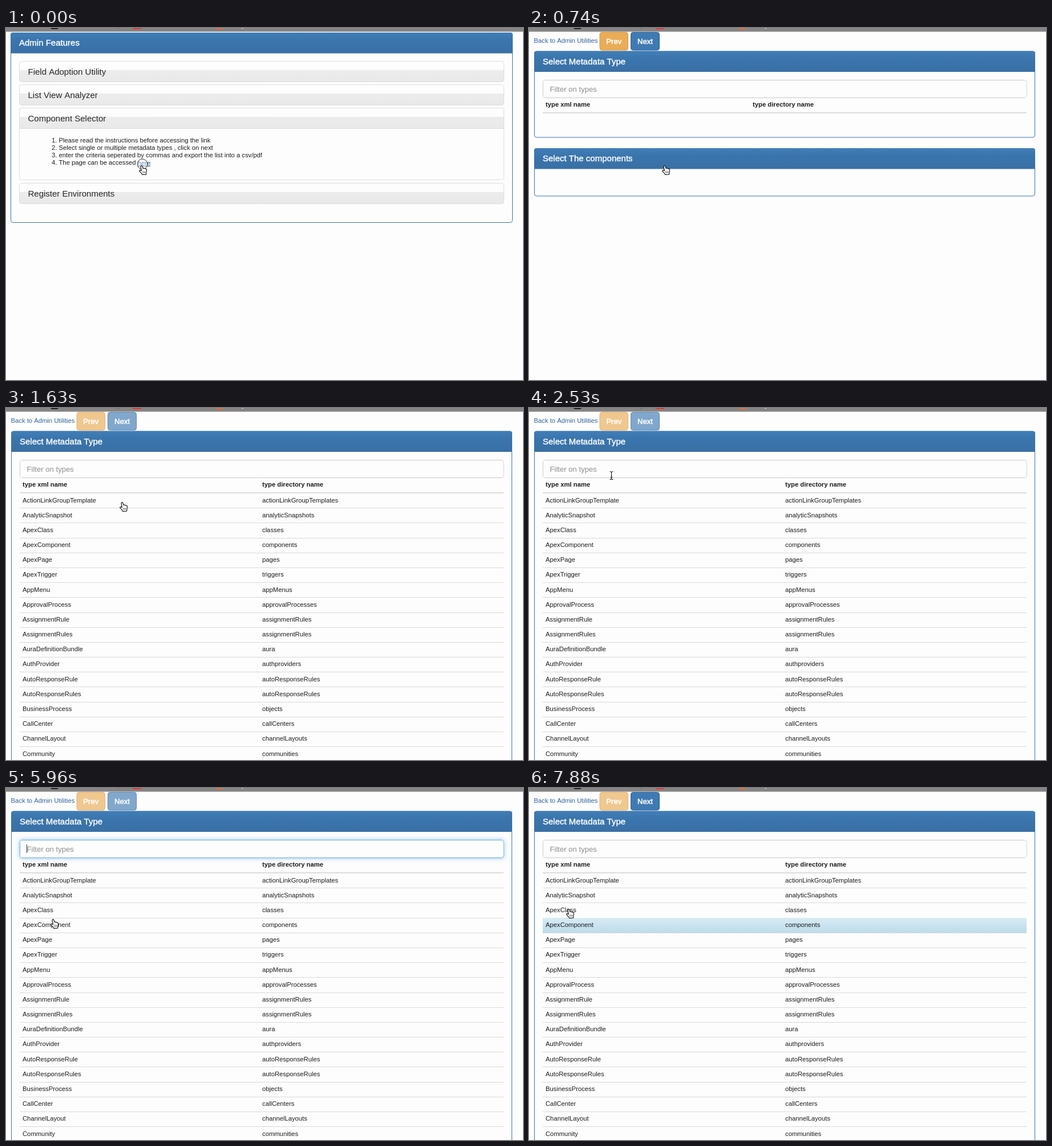
An HTML page with a canvas that plays this animation: 906 by 618 pixels, repeating every 8000 ms.

```html
<!DOCTYPE html>
<html lang="en">
<head>
<meta charset="utf-8">
<title>Admin Features</title>
<style>
  html, body { margin: 0; width: 100%; height: 100%; overflow: hidden; background: #fdfdfd; }
  canvas { display: block; }
</style>
</head>
<body>
<canvas id="stage" width="906" height="618"></canvas>
<script>
const ctx = document.getElementById('stage').getContext('2d');
const W = 906, H = 618, LOOP = 8000;
const FAMILY = '"Liberation Sans", Arial, sans-serif';
const PAGE = '#fdfdfd', BLUE = '#3b75ac', INK = '#1c1c1c';
const SMALL = 11.25, MEDIUM = 13.125, LARGE = 15;

const TYPES = [
  ['ActionLinkGroupTemplate', 'actionLinkGroupTemplates'],
  ['AnalyticSnapshot', 'analyticSnapshots'],
  ['ApexClass', 'classes'],
  ['ApexComponent', 'components'],
  ['ApexPage', 'pages'],
  ['ApexTrigger', 'triggers'],
  ['AppMenu', 'appMenus'],
  ['ApprovalProcess', 'approvalProcesses'],
  ['AssignmentRule', 'assignmentRules'],
  ['AssignmentRules', 'assignmentRules'],
  ['AuraDefinitionBundle', 'aura'],
  ['AuthProvider', 'authproviders'],
  ['AutoResponseRule', 'autoResponseRules'],
  ['AutoResponseRules', 'autoResponseRules'],
  ['BusinessProcess', 'objects'],
  ['CallCenter', 'callCenters'],
  ['ChannelLayout', 'channelLayouts'],
  ['Community', 'communities']
];

const STEPS = [
  'Please read the instructions before accessing the link',
  'Select single or multiple metadata types , click on next',
  'enter the criteria seperated by commas and export the list into a csv/pdf',
  'The page can be accessed '
];

// Pointer stops: time, shape, x, y
const POINTER = [
  [0, hand, 233, 241],
  [1330, hand, 231, 236],
  [1480, hand, 219, 207],
  [1630, hand, 199, 165],
  [1780, beam, 184, 128],
  [1930, beam, 177, 115],
  [2530, beam, 144, 118],
  [5530, beam, 137, 130],
  [5680, hand, 107, 168],
  [5830, hand, 87, 209],
  [5960, hand, 78, 230],
  [6110, hand, 74, 244],
  [7740, hand, 69, 227],
  [7880, hand, 65, 212]
];

// Times at which the text caret flips, starting hidden
const CARET_FLIPS = [3130, 3430, 3880, 4480, 4930, 5380, 5830, 6400, 6850, 7300];

const within = (t, from, to) => t >= from && t < to;

function text(str, x, y, size, color = INK, { bold = false, align = 'left', weight = 0 } = {}) {
  ctx.font = `${bold ? 'bold ' : ''}${size}px ${FAMILY}`;
  ctx.textAlign = align;
  ctx.fillStyle = color;
  ctx.fillText(str, x, y);
  if (weight) {
    ctx.strokeStyle = color;
    ctx.lineWidth = weight;
    ctx.strokeText(str, x, y);
  }
}

function box(x, y, w, h, radius, fill, stroke) {
  ctx.beginPath();
  ctx.roundRect(x, y, w, h, radius);
  if (fill) { ctx.fillStyle = fill; ctx.fill(); }
  if (stroke) { ctx.strokeStyle = stroke; ctx.lineWidth = 1; ctx.stroke(); }
}

function rule(x1, x2, y, color, width = 1) {
  ctx.fillStyle = color;
  ctx.fillRect(x1, y, x2 - x1, width);
}

function vertical(y, h, ...stops) {
  const g = ctx.createLinearGradient(0, y, 0, y + h);
  stops.forEach(([at, color]) => g.addColorStop(at, color));
  return g;
}

function topBar() {
  rule(0, W, 0, '#868484', 6.5);
  box(78, -6, 14, 8, 3, '#222');
  box(221, -6, 17, 8, 3, '#e23b35');
  box(367, -6, 14, 8, 3, '#ec6d35');
  rule(196, 198, 0, '#555');
  rule(413, 416, 0, '#ddd');
}

function panel(x, y, w, h, title) {
  box(x, y, w, h, 4, PAGE, BLUE);
  box(x - 0.5, y - 0.5, w + 1, 36.5, [4, 4, 0, 0],
    vertical(y, 36, [0, '#407db7'], [0.35, '#3b75ad'], [1, '#3970a5']));
  text(title, x + 14.5, y + 22.5, LARGE, '#fff', { weight: 0.4 });
}

function accordion(y, title, open) {
  const h = 36, grey = vertical(y, h, [0, PAGE], [0.42, PAGE], [0.42, '#ececec'], [1, '#e9e9e9']);
  if (open) box(23.5, y, 849, 126, 4, PAGE, '#ddd');
  box(23.5, y, 849, h, open ? [4, 4, 0, 0] : 4, grey, '#ddd');
  text(title, 38.5, y + 23, LARGE, '#282828');
}

function adminPage() {
  panel(8.5, 8.5, 879, 333, 'Admin Features');
  accordion(58.5, 'Field Adoption Utility');
  accordion(99.5, 'List View Analyzer');
  accordion(140.5, 'Component Selector', true);
  accordion(272.5, 'Register Environments');
  STEPS.forEach((line, i) => {
    const y = 201 + i * 13.15;
    text(`${i + 1}.`, 89.5, y, SMALL, INK, { align: 'right' });
    text(line, 92.5, y, SMALL);
  });
  text('here', 231, 240.5, SMALL, '#2b5c8e');
  rule(231, 253, 242, '#2b5c8e');
}

function button(label, x, w, fill, edge, enabled) {
  ctx.globalAlpha = enabled ? 1 : 0.65;
  box(x, 7.5, w, 31.5, 4, fill, edge);
  ctx.globalAlpha = 1;
  text(label, x + w / 2, 28, MEDIUM, '#fff', { align: 'center', weight: 0.5 });
}

function filterInput(focus, caret) {
  ctx.save();
  if (focus) {
    ctx.shadowColor = `rgba(102,175,233,${0.7 * focus})`;
    ctx.shadowBlur = 7;
  }
  box(24.5, 91.5, 847.5, 31, 4, PAGE, focus ? (focus < 1 ? '#98bedd' : '#72aee0') : '#c9c9c9');
  ctx.restore();
  box(25, 92, 846.5, 30, 3.5, PAGE);
  text('Filter on types', 36.5, 111.5, MEDIUM, '#8e8e8e');
  if (caret) {
    ctx.fillStyle = '#333';
    ctx.fillRect(36, 99, 1, 15);
  }
}

function tableHead(secondColumn) {
  text('type xml name', 29, 138, SMALL, INK, { bold: true });
  text('type directory name', secondColumn, 138, SMALL, INK, { bold: true });
  rule(24, 872, 148, '#d8d8d8', 1.7);
}

function tableRows(selected) {
  TYPES.forEach(([xml, directory], i) => {
    const offset = i * 26.18, top = Math.round(149.3 + offset);
    if (i === selected) {
      ctx.fillStyle = vertical(top, 26, [0, '#d9ebf5'], [1, '#bcdceb']);
      ctx.fillRect(24, top, 848, 26);
    }
    text(xml, 29, 165.5 + offset, SMALL);
    text(directory, 449, 165.5 + offset, SMALL);
    rule(24, 872, top + 26, '#d9d9d9');
  });
}

function selectorPage(t) {
  const loaded = t >= 1330, chosen = t >= 7440;
  const caret = CARET_FLIPS.filter(at => t >= at).length % 2 === 1;
  const focus = within(t, 3130, 7300) ? 1 : within(t, 2980, 3130) || within(t, 7300, 7440) ? 0.5 : 0;

  text('Back to Admin Utilities', 8.5, 26, SMALL, '#2f639c');
  button('Prev', 124, 49.5, '#e9ac57', '#dd9c45', t < 1040);
  button('Next', 178.5, 50, '#407ab3', '#2f659a', t < 1040 || chosen);

  panel(9.5, 41, 877, loaded ? 620 : t < 1040 ? 151 : 141, 'Select Metadata Type');
  filterInput(focus, caret);
  tableHead(loaded ? 449 : 392);
  if (loaded) tableRows(chosen ? 3 : -1);
  else if (t < 1040) panel(9.5, 211.5, 877, 83.5, 'Select The components');
  else rule(9, 887, 202, '#f1f1f1');
}

function hand(x, y) {
  ctx.save();
  ctx.translate(x, y);
  ctx.lineJoin = 'round';
  const outline = new Path2D(
    'M3 1.8Q3.3.5 4.6.6Q5.7.7 6 2L7.1 5.5Q8.5 4.4 9.4 5.8Q10.7 5 11.5 6.4' +
    'Q13.2 6 13.4 7.8Q13.9 10.5 12.9 12.5L12.4 16.3L5.4 16.4L4.7 14.4L1.1 10.6' +
    'Q.1 8.8 1.7 8.5L4.3 9.6Z');
  ctx.fillStyle = '#fff';
  ctx.fill(outline);
  ctx.strokeStyle = '#111';
  ctx.lineWidth = 1.15;
  ctx.stroke(outline);
  ctx.lineWidth = 0.7;
  ctx.stroke(new Path2D('M6.7 10.5V13.6M8.7 10.5V13.6M10.7 10.5V13.6'));
  ctx.restore();
}

function beam(x, y) {
  ctx.save();
  ctx.translate(x + 0.5, y + 0.5);
  const shape = new Path2D('M-3-7Q-.5-7 0-5.5Q.5-7 3-7M0-5.5V5.5M-3 7Q-.5 7 0 5.5Q.5 7 3 7M-1.8 3H1.8');
  ctx.strokeStyle = '#fff';
  ctx.lineWidth = 2.2;
  ctx.stroke(shape);
  ctx.strokeStyle = '#111';
  ctx.lineWidth = 1.1;
  ctx.stroke(shape);
  ctx.restore();
}

function clickRing(x, y) {
  ctx.beginPath();
  ctx.arc(x, y, 8.9, 0, Math.PI * 2);
  ctx.fillStyle = 'rgba(255,255,255,0.35)';
  ctx.fill();
  ctx.strokeStyle = '#333';
  ctx.lineWidth = 1;
  ctx.stroke();
}

function pointer(t) {
  const [, shape, x, y] = POINTER.findLast(([at]) => t >= at);
  if (t < 150 || within(t, 2980, 3130) || within(t, 7300, 7440)) {
    if (shape === hand) clickRing(x + 6, y - 2);
    else clickRing(x, y);
  }
  shape(x, y);
}

function draw(t) {
  ctx.fillStyle = PAGE;
  ctx.fillRect(0, 0, W, H);
  topBar();
  if (t < 740) adminPage();
  else selectorPage(t);
  pointer(t);
}

const start = performance.now();
function tick() {
  draw((performance.now() - start) % LOOP);
  requestAnimationFrame(tick);
}
tick();
</script>
</body>
</html>
```
